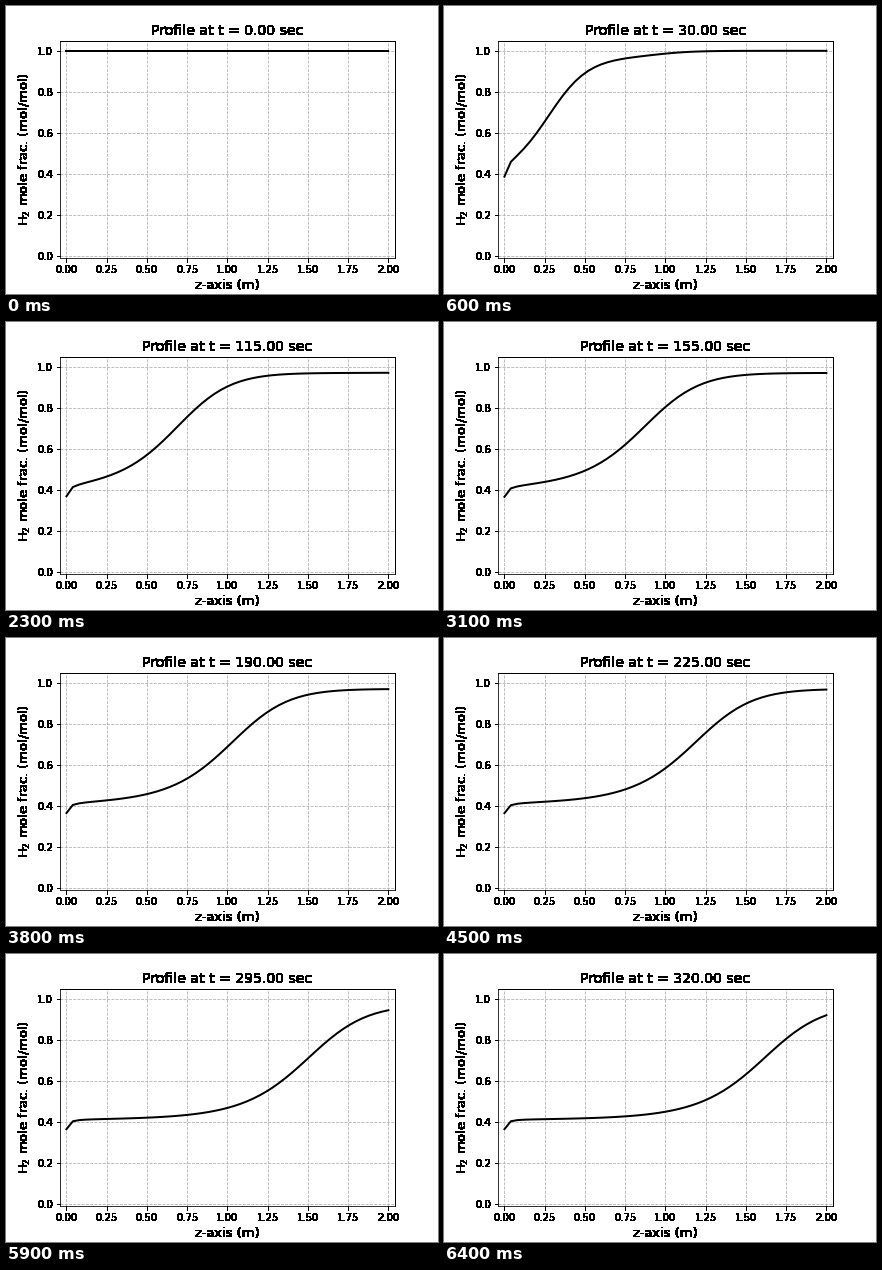
Animation of 432 by 288 pixels, one loop 6.5 s. Source, as a matplotlib script:

```python
import numpy as np
import matplotlib.pyplot as plt
from matplotlib.animation import FuncAnimation

FRAMES = 65
STEP = 5.0  # simulated seconds per frame
FEED, PLATEAU = 0.408, 0.97

plt.rcParams.update({"font.family": "DejaVu Sans", "font.size": 10})

z = np.linspace(0, 2, 51)


def logistic(x):
    return 1 / (1 + np.exp(-x))


def profile(t):
    """Hydrogen fraction along the bed: a slow main front behind a fast weak one."""
    if t == 0:
        return np.ones_like(z)
    start = 1 - np.exp(-t / 10)

    # main front, widening with time and slightly skewed
    s = z - (0.15 * start + 0.00448 * t)
    steep = 4.75 + 100 / t
    skew = 1.25 * (1 - np.exp(-(t / 60) ** 2))
    main = logistic(steep * s + skew * s**2)

    # fast front from the plateau up to pure hydrogen
    lead = logistic((1 + 250 / (t + 2)) * (z - 0.22 * start - 0.025 * t))
    y = FEED + (PLATEAU - FEED) * main + (1 - PLATEAU) * lead

    # depletion next to the inlet
    d = z - z[1]
    dip = 0.032 * np.exp(-t / 140) * (1 - np.exp(-t / 30))
    y -= 0.006 * np.exp(-d / 0.03) + dip * np.exp(-d / 0.14)
    y[0] = 0.366 + 0.4 * (y[1] - 0.407)
    return y


def harden(img, dpi):
    """Make every touched pixel fully opaque, giving crisp heavy edges."""
    out = img.copy()
    out[..., 3] = (img[..., 3] > 0).astype(float)
    return out, 0, 0


fig = plt.figure(figsize=(6, 4), dpi=72, facecolor="white")
fig.subplots_adjust(left=0.125, right=0.9, bottom=0.125, top=0.88)
ax = fig.add_subplot()
ax.set_xlim(-0.04, 2.04)
ax.set_ylim(-0.01, 1.05)
ax.set_xticks(np.arange(0, 2.01, 0.25))
ax.set_yticks(np.arange(0, 1.01, 0.2))
ax.grid(linestyle="--")
ax.set_xlabel("z-axis (m)", fontsize=13)
ax.set_ylabel("H$_2$ mole frac. (mol/mol)", fontsize=13)
title = ax.set_title("", fontsize=14)
line, = ax.plot(z, profile(0), color="black", linewidth=2)

crisp = [title, ax.xaxis.label, ax.yaxis.label, ax.spines["top"], ax.spines["right"]]
for axis in (ax.xaxis, ax.yaxis):
    for tick in axis.get_major_ticks():
        crisp += [tick.label1, tick.tick1line]
for artist in crisp:
    artist.set_agg_filter(harden)


def update(i):
    t = i * STEP
    line.set_ydata(profile(t))
    title.set_text(f"Profile at t = {t:.2f} sec")
    return line, title


anim = FuncAnimation(fig, update, frames=FRAMES, interval=100,
                     init_func=lambda: update(0), repeat=True, repeat_delay=0)
plt.show()
```
